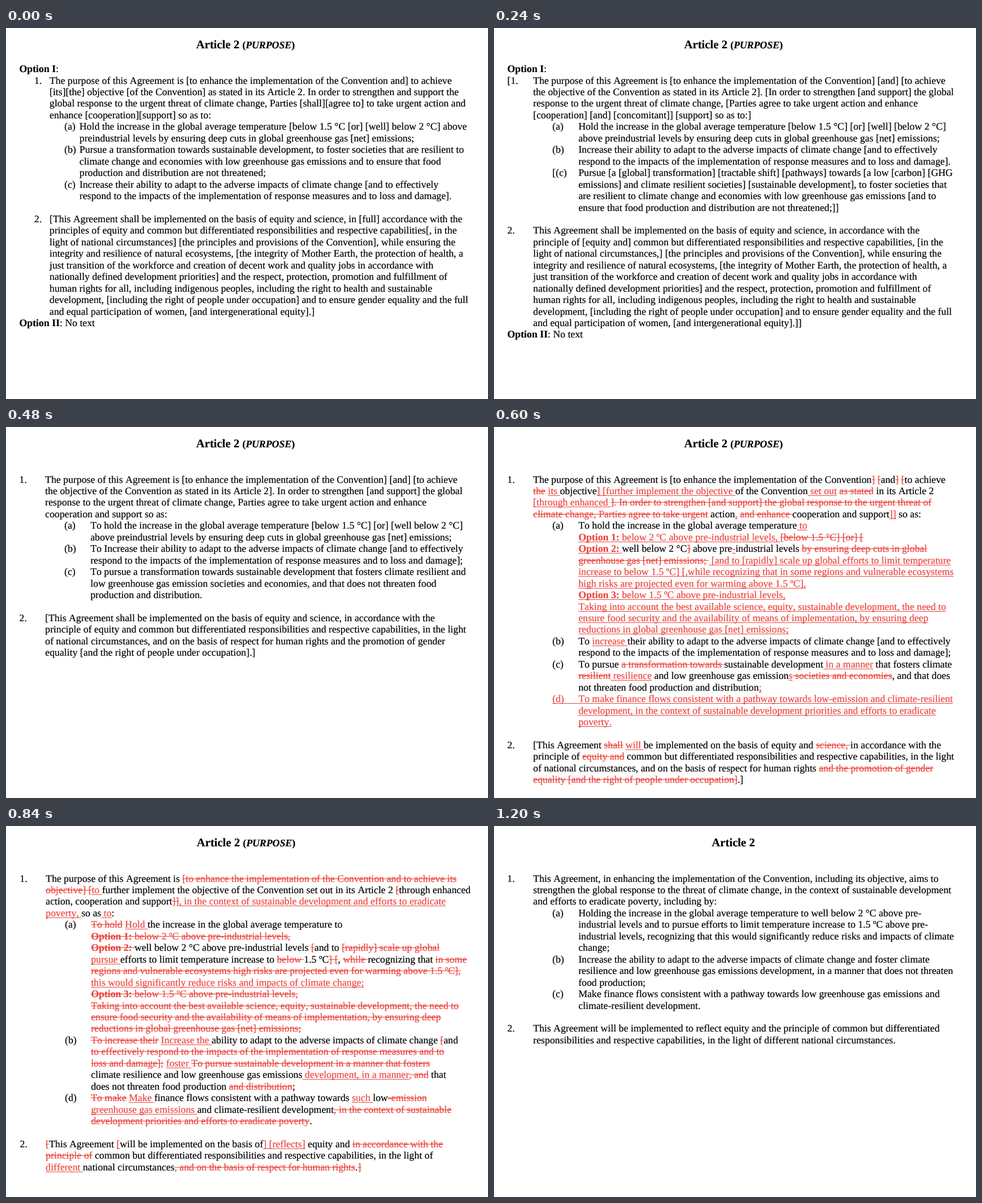
Animation of 853x657 px, one loop 1.32 s. Source, as an HTML page:

```html
<!DOCTYPE html>
<html lang="en">
<head>
<meta charset="utf-8">
<title>Article 2 drafts</title>
<style>
  html, body { margin: 0; width: 100%; height: 100%; overflow: hidden; background: #fff; }
  #reel {
    height: 1100%;
    animation: flip 1320ms steps(11) infinite;
    font: 17.78px/20px "Liberation Serif", "Times New Roman", Times, serif;
    font-kerning: none;
    font-variant-ligatures: none;
    text-rendering: geometricPrecision;
    -webkit-text-stroke: .2px;
    color: #000;
  }
  @keyframes flip { to { transform: translateY(-100%); } }
  .page { position: relative; height: calc(100% / 11); overflow: hidden; }
  .page > * { position: absolute; margin: 0; white-space: pre; }
  h1 { top: 20px; font-size: 20.74px; font-weight: bold; line-height: 20px; }
  h1 small { font-size: 17.78px; }
  ins, del { color: #ea433c; text-decoration-thickness: 1px; text-decoration-skip-ink: none; }
  ins { text-underline-offset: 2px; }
</style>
</head>
<body>
<div id="reel"></div>
<script>
// Markup: {inserted} <deleted> *bold*; each | moves on to the next column.
const adapt = 'ability to adapt to the adverse impacts of climate change';
const respond = 'respond to the impacts of the implementation of response measures and to loss and damage]';
const duties = 'common but differentiated responsibilities and respective capabilities';
const holdTo = 'the increase in the global average temperature';
const cuts = 'above preindustrial levels by ensuring deep cuts in global greenhouse gas [net] emissions;';
const opening = 'The purpose of this Agreement is';
const nature = 'integrity and resilience of natural ecosystems, [the integrity of Mother Earth, the protection of health, a';
const work = 'just transition of the workforce and creation of decent work and quality jobs in accordance with';
const science = ['Taking into account the best available science, equity, sustainable development, the need to',
  'ensure food security and the availability of means of implementation, by ensuring deep',
  'reductions in global greenhouse gas [net] emissions;'];
const block = (lines, before, after = '') => lines.map(s => before + s + after).join('\n');
const rights = before => block([nature, work,
  'nationally defined development priorities] and the respect, protection, promotion and fulfillment of',
  'human rights for all, including indigenous peoples, including the right to health and sustainable',
  'development, [including the right of people under occupation] and to ensure gender equality and the full',
  'and equal participation of women, [and intergenerational equity].]'], before);

const first = `*Option I*:
|1.|${opening} [to enhance the implementation of the Convention and] to achieve
||[its][the] objective [of the Convention] as stated in its Article 2. In order to strengthen and support the
||global response to the urgent threat of climate change, Parties [shall][agree to] to take urgent action and
||enhance [cooperation][support] so as to:
|||(a)|Hold ${holdTo} [below 1.5 °C [or] [well] below 2 °C] above
||||preindustrial levels by ensuring deep cuts in global greenhouse gas [net] emissions;
|||(b)|Pursue a transformation towards sustainable development, to foster societies that are resilient to
||||climate change and economies with low greenhouse gas emissions and to ensure that food
||||production and distribution are not threatened;
|||(c)|Increase their ${adapt} [and to effectively
||||${respond}.

|2.|[This Agreement shall be implemented on the basis of equity and science, in [full] accordance with the
||principles of equity and common but differentiated responsibilities and respective capabilities[, in the
||light of national circumstances] [the principles and provisions of the Convention], while ensuring the
${rights('||')}
*Option II*: No text`;

const second = `*Option I*:
{[}1.|${opening} [to enhance the implementation of the Convention{]} {[}and] {[}to achieve
|<[its][>the<]> objective <[>of the Convention<]> as stated in its Article 2{]}. {[}In order to strengthen {[}and support{]} the
|global response to the urgent threat of climate change, {[}Parties <[shall][>agree to<]> to take urgent action and
|enhance [cooperation]{ [and] [concomitant]] }[support] so as to:{]}
||(a)|Hold ${holdTo} [below 1.5 °C{]} [or] [well] {[}below 2 °C]
|||${cuts}
||{(b)      }|{Increase their ${adapt} [and to effectively}
|||{${respond}.}
||{[}({c})|Pursue {[}a {[global]} transformation{] [tractable shift] [pathways]} towards{ [a low [carbon] [GHG}
|||{emissions] and climate resilient societies]} {[}sustainable development{]}, to foster societies that
|||are resilient to climate change and economies with low greenhouse gas emissions {[}and to
|||ensure that food production and distribution are not threatened;{]]}

2.|<[>This Agreement shall be implemented on the basis of equity and science, in <[full]> accordance with the
|principle<s> of {[}equity and{]} ${duties}<[>, {[}in the
|light of national circumstances{,}] [the principles and provisions of the Convention], while ensuring the
${rights('|')}{]}
*Option II*: No text`;

const accept = t => t.replace(/<.*?>/g, '').replace(/[{}]/g, '').replace(/ +/g, ' ');
const secondClean = accept(second).split('\n');
secondClean.splice(2, 3,
  '|the objective of the Convention as stated in its Article 2]. [In order to strengthen [and support] the global',
  '|response to the urgent threat of climate change, [Parties agree to take urgent action and enhance',
  '|[cooperation] [and] [concomitant]] [support] so as to:]');

const third = `<*Option I:*>
<[>1.|${opening} [to enhance the implementation of the Convention] [and] [to achieve
|the objective of the Convention as stated in its Article 2]. <[>In order to strengthen [and support] the global
|response to the urgent threat of climate change, <[>Parties agree to take urgent action and enhance
|<[>cooperation<]> <[>and<]> <[concomitant]]> <[>support<]> so as <to>:<]>
||(a)|{To hold }${holdTo} [below 1.5 °C] [or] [well<]> <[>below 2 °C]
|||${cuts}
||(b)|{To }Increase their ${adapt} [and to effectively
|||${respond.slice(0, -1)}{];}
||<[>(c)|{To pursue }<[>a <[global]> transformation<]> <[tractable shift] [pathways]> towards <[a low [carbon]>
|||<[GHG emissions] and climate resilient societies] [>sustainable development<],> <to> {that} foster{s}
|||{climate resilient and low greenhouse gas emission} societies <that are resilient to climate change>
|||and economies{,} <with low greenhouse gas emissions> <[>and <to ensure> that{ does not threaten} food
|||production and distribution{.} <are not threatened;]]>

2.|{[}This Agreement shall be implemented on the basis of equity and science, in accordance with the
|principle of <[>equity and<]> ${duties}, <[>in the
|light of national circumstances,<]> <[the principles and provisions of the Convention], while ensuring the>
|<${nature}>
|<${work}>
|<nationally defined development priorities]> and{ on} the {basis of} respect<,> <protection, promotion and>
|<fulfillment of> {for }human rights{ and the promotion of gender equality} <for all, including indigenous>
|<peoples, including the right to health and sustainable development,> [<including> {and }the right of people
|under occupation]{.]} <and to ensure gender equality and the full and equal participation of women, [and>
|<intergenerational equity].]]>
<*Option II*: No text>`;

const thirdClean = `
1.|${opening} [to enhance the implementation of the Convention] [and] [to achieve
|the objective of the Convention as stated in its Article 2]. In order to strengthen [and support] the global
|response to the urgent threat of climate change, Parties agree to take urgent action and enhance
|cooperation and support so as:
||(a)|To hold ${holdTo} [below 1.5 °C] [or] [well below 2 °C]
|||${cuts}
||(b)|To Increase their ${adapt} [and to effectively
|||${respond};
||(c)|To pursue a transformation towards sustainable development that fosters climate resilient and
|||low greenhouse gas emission societies and economies, and that does not threaten food
|||production and distribution.

2.|[This Agreement shall be implemented on the basis of equity and science, in accordance with the
|principle of equity and ${duties}, in the light
|of national circumstances, and on the basis of respect for human rights and the promotion of gender
|equality [and the right of people under occupation].]`;

const fourth = `
1.|${opening} [to enhance the implementation of the Convention<]> <[>and<]> <[>to achieve
|<the> {its }objective{] [further implement the objective }of the Convention{ set out} <as stated> in its Article 2
|{[through enhanced }<]. In order to strengthen [and support] the global response to the urgent threat of>
|<climate change, Parties agree to take urgent> action{,} <and enhance >cooperation and support{]]} so as:
||(a)|To hold ${holdTo}{ to}
|||{*Option 1:* below 2 ºC above pre-industrial levels, }<[below 1.5 °C] [or] [>
|||{*Option 2:* }well below 2 °C<]> above pre{-}industrial levels <by ensuring deep cuts in global>
|||<greenhouse gas [net] emissions; >{ [and to [rapidly] scale up global efforts to limit temperature}
|||{increase to below 1.5 ºC] [,while recognizing that in some regions and vulnerable ecosystems}
|||{high risks are projected even for warming above 1.5 ºC],}
|||{*Option 3:* below 1.5 ºC above pre-industrial levels,}
${block(science, '|||{', '}')}
||(b)|To {increase }their ${adapt} [and to effectively
|||${respond};
||(c)|To pursue <a transformation towards >sustainable development{ in a manner} that fosters climate
|||<resilient>{ resilience} and low greenhouse gas emission{s}< societies and economies>, and that does
|||not threaten food production and distribution{;}
||{(d)      }|{To make finance flows consistent with a pathway towards low-emission and climate-resilient}
|||{development, in the context of sustainable development priorities and efforts to eradicate}
|||{poverty.}

2.|[This Agreement <shall> {will }be implemented on the basis of equity and <science, >in accordance with the
|principle of <equity and> ${duties}, in the light
|of national circumstances, and on the basis of respect for human rights <and the promotion of gender>
|<equality [and the right of people under occupation]>.]`;

const fourthClean = `
1.|${opening} [to enhance the implementation of the Convention and to achieve its
|objective] [further implement the objective of the Convention set out in its Article 2 [through enhanced
|action, cooperation and support]] so as:
||(a)|To hold ${holdTo} to
|||*Option 1:* below 2 ºC above pre-industrial levels,
|||*Option 2:* well below 2 °C above pre-industrial levels [and to [rapidly] scale up global efforts
|||to limit temperature increase to below 1.5 ºC] [,while recognizing that in some regions and
|||vulnerable ecosystems high risks are projected even for warming above 1.5 ºC],
|||*Option 3:* below 1.5 ºC above pre-industrial levels,
${block(science, '|||')}
||(b)|To increase their ${adapt} [and to effectively
|||${respond};
||(c)|To pursue sustainable development in a manner that fosters climate resilience and low
|||greenhouse gas emissions, and that does not threaten food production and distribution;
||(d)|To make finance flows consistent with a pathway towards low-emission and climate-resilient
|||development, in the context of sustainable development priorities and efforts to eradicate
|||poverty.

2.|[This Agreement will be implemented on the basis of equity and in accordance with the principle of
|${duties}, in the light of national
|circumstances, and on the basis of respect for human rights.]`;

const fifth = `
1.|${opening} <[to enhance the implementation of the Convention and to achieve its>
|<objective] [>{to }further implement the objective of the Convention set out in its Article 2 <[>through enhanced
|action, cooperation and support<]]>{, in the context of sustainable development and efforts to eradicate}
|{poverty, }so as{ to}:
||(a)|<To hold> {Hold }${holdTo} to
|||<*Option 1:* below 2 ºC above pre-industrial levels,>
|||<*Option 2:* >well below 2 °C above pre-industrial levels <[>and to <[rapidly] scale up global>
|||{pursue }efforts to limit temperature increase to <below >1.5 ºC<] [>, <while >recognizing that <in some>
|||<regions and vulnerable ecosystems high risks are projected even for warming above 1.5 ºC],>
|||{this would significantly reduce risks and impacts of climate change;}
|||<*Option 3:* below 1.5 ºC above pre-industrial levels,>
${block(science, '|||<', '>')}
||(b)|<To increase their> {Increase the }${adapt} <[>and
|||<to effectively respond to the impacts of the implementation of response measures and to>
|||<loss and damage];> {foster }<To pursue sustainable development in a manner that fosters>
|||climate resilience and low greenhouse gas emissions{ development, in a manner}<, and> that
|||does not threaten food production <and distribution>;
||(d)|<To make> {Make }finance flows consistent with a pathway towards {such }low<-emission>
|||{greenhouse gas emissions }and climate-resilient development<, in the context of sustainable>
|||<development priorities and efforts to eradicate poverty>.

2.|<[>This Agreement {[}will be implemented on the basis of{] [reflects]} equity and <in accordance with the>
|<principle of> ${duties}, in the light of
|{different }national circumstances<, and on the basis of respect for human rights>.<]>`;

const fifthClean = `
1.|${opening} to further implement the objective of the Convention set out in its
|Article 2 through enhanced action, cooperation and support, in the context of sustainable development
|and efforts to eradicate poverty, so as to:
||(a)|Hold ${holdTo} to well below 2 °C above pre-industrial
|||levels and to pursue efforts to limit temperature increase to 1.5 ºC, recognizing that this would
|||significantly reduce risks and impacts of climate change;
||(b)|Increase the ${adapt} and foster-climate
|||resilience and low greenhouse gas emissions development, in a manner that does not threaten
|||food production;
||(d)|Make finance flows consistent with a pathway towards such low greenhouse gas emissions
|||and climate-resilient development.

2.|This Agreement [will be implemented on the basis of] [reflects] equity and-common but differentiated
|responsibilities and respective capabilities, in the light of different national circumstances.`;

const sixth = `
1.|<${opening} to further implement the objective of the Convention set out in its>
|<Article 2 through enhanced action, cooperation and support> {This Agreement, in enhancing the}
|{implementation of the Convention, including its objective, aims to strengthen the global response to the}
|{threat of climate change}, in the context of sustainable development and efforts to eradicate poverty,
|<so as to> {including by}:
||(a)|<Hold> {Holding }${holdTo} to well below 2 °C above pre-
|||industrial levels and to pursue efforts to limit temperature increase to 1.5 ºC{ above pre-}
|||{industrial levels}, recognizing that this would significantly reduce risks and impacts of climate
|||change;
||(b)|Increase the ${adapt} and foster climate
|||resilience and low greenhouse gas emissions development, in a manner that does not threaten
|||food production;
||(<d>{c})|Make finance flows consistent with a pathway towards <such >low greenhouse gas emissions
|||and climate-resilient development.

2.|This Agreement <[>will be implemented <on the basis of] [reflects]> {to reflect }equity and {the principle of}
|${duties}, in the light of
|different national circumstances.`;

const sixthClean = `
1.|This Agreement, in enhancing the implementation of the Convention, including its objective, aims to
|strengthen the global response to the threat of climate change, in the context of sustainable development
|and efforts to eradicate poverty, including by:
||(a)|Holding ${holdTo} to well below 2 °C above pre-
|||industrial levels and to pursue efforts to limit temperature increase to 1.5 ºC above pre-
|||industrial levels, recognizing that this would significantly reduce risks and impacts of climate
|||change;
||(b)|Increase the ${adapt} and foster climate
|||resilience and low greenhouse gas emissions development, in a manner that does not threaten
|||food production;
||(c)|Make finance flows consistent with a pathway towards low greenhouse gas emissions and
|||climate-resilient development.

2.|This Agreement will be implemented to reflect equity and the principle of common but differentiated
|responsibilities and respective capabilities, in the light of different national circumstances.`;

const markup = t => t
  .replace(/<(.*?)>/g, '<del>$1</del>')
  .replace(/{(.*?)}/g, '<ins>$1</ins>')
  .replace(/\*(.*?)\*/g, '<b>$1</b>');

const wide = [23.5, 69.3, 103.3, 149.4];
const purpose = '<small>(<i>PURPOSE</i>)</small>';

function page(text, { cols = wide, shift = 0, title = `Article 2 ${purpose}`, titleX = 336.5 } = {}) {
  const body = text.split('\n').map((line, row) => {
    const top = Math.round(78.1 + 20.45 * row) - 16;
    return line.split('|').map((part, i) => part &&
      `<div style="left:${cols[i] + shift}px;top:${top}px">${markup(part)}</div>`).join('');
  }).join('');
  return `<section class="page"><h1 style="left:${titleX + shift}px">${title}</h1>${body}</section>`;
}

const moved = { shift: 1 };
document.getElementById('reel').innerHTML = [
  page(first, { cols: [23.5, 50, 77, 103.3, 130] }),
  page(second),
  page(secondClean.join('\n')),
  page(third),
  page(thirdClean),
  page(fourth),
  page(fourthClean, moved),
  page(fifth, moved),
  page(fifthClean, moved),
  page(sixth, { shift: 1, title: `Article 2 <del>${purpose}</del>` }),
  page(sixthClean, { title: 'Article 2', titleX: 385.3 })
].join('');
</script>
</body>
</html>
```
